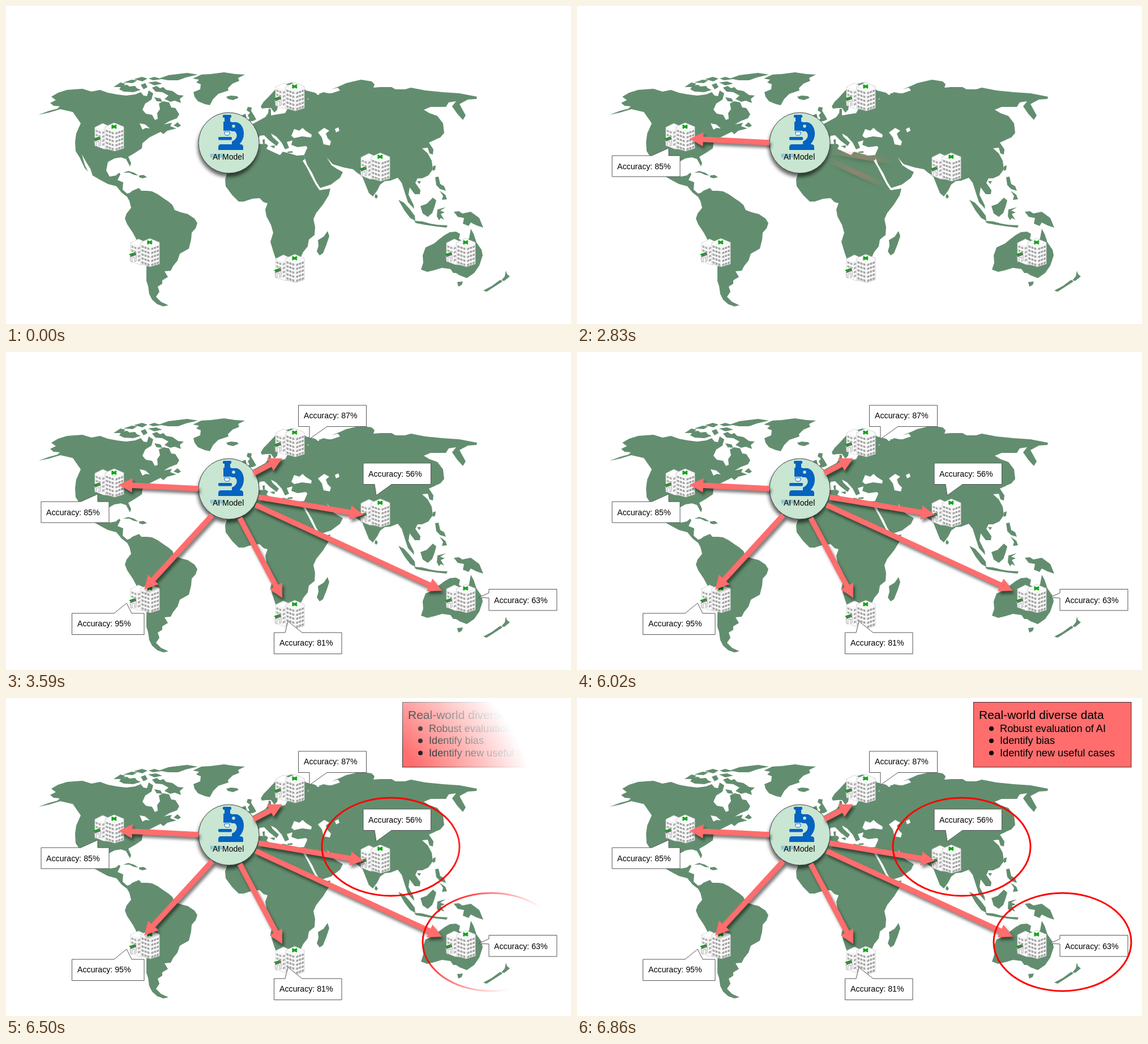
An HTML page for the animation above (9040 ms loop, 998 px wide and 561 px high).

```html
<!DOCTYPE html>
<html lang="en">
<head>
<meta charset="utf-8">
<title>AI model accuracy map</title>
<style>
html, body { margin: 0; width: 100%; height: 100%; overflow: hidden; background: #fff; }
svg { position: absolute; left: 0; top: 0; width: 998px; height: 561px; font-family: "Liberation Sans", Arial, sans-serif; }
.layer {
  --r: 0px;
  -webkit-mask-image: radial-gradient(circle at 499px 280.5px, #000 calc(var(--r) - 180px), transparent var(--r));
  mask-image: radial-gradient(circle at 499px 280.5px, #000 calc(var(--r) - 180px), transparent var(--r));
}
.land { fill: #628e6f; }
.sea { fill: #fff; }
.arrow { fill: #ff6d6d; filter: drop-shadow(3px 5px 2.5px rgba(0,0,0,.5)); }
.box { fill: #fff; stroke: #555; stroke-width: 1; }
.ring { fill: none; stroke: #f00; stroke-width: 3; }
.label { font-size: 14.2px; }
.model { filter: drop-shadow(-1px 6px 3px rgba(0,0,0,.6)); }
</style>
</head>
<body>
<svg viewBox="0 0 998 561">
  <defs>
    <g id="hospital">
      <path d="M3 8L17 1L30 7V47L18 46L3 40Z" fill="#fff" stroke="#ccc" stroke-width=".8"/>
      <path d="M3 8L15 14V44M15 14L30 7" fill="none" stroke="#e2e2e2" stroke-width=".8"/>
      <g id="wingWindows" fill="#b0b0b0"></g>
      <path d="M2 31L13 29V40L10 41V33L6 34V42L3 41Z" fill="#eee" stroke="#999" stroke-width=".7"/>
      <path d="M0 28L10 24.5L13 26.5L3 30.5Z" fill="#169c1c"/>
      <path d="M3 30.5L13 26.5V29L3 33Z" fill="#666"/>
      <path d="M21 7L37 0L54 7V45L38 50L21 45Z" fill="#fff" stroke="#c4c4c4" stroke-width=".8"/>
      <path d="M21 7L38 14L54 7M38 14V50" fill="none" stroke="#e2e2e2" stroke-width=".8"/>
      <g id="towerWindows" fill="#a6a6a6"></g>
      <path d="M32.5 4.5L41 9.5M41 4.5L32.5 9.5" stroke="#13a519" stroke-width="3.2"/>
    </g>
  </defs>

  <g class="land">
    <!-- North America, then its western side -->
    <path d="M57 192L76 185L91 181L95 177L84 176L78 171L88 166L80 160L92 153L108 148L135 146L151 151L166 148L180 153L196 156L212 158L228 156L238 152L243 158L249 159L252 149L260 154L257 165L246 172L241 183L247 190L258 192L263 201L268 199L267 189L272 182L270 172L278 168L288 170L292 179L299 180L306 191L302 198L289 203L279 209L293 206L290 212L301 216L285 220L278 226L273 222L253 232L241 242L240 251L228 259L216 266L221 277L219 283L212 270L203 267L191 269L180 275L150 230L132 207L118 187L96 182L76 188Z"/>
    <path d="M190 230L191 269L180 275L177 290L183 301L194 299L200 294L202 297L197 307L207 311L206 324L214 331L224 328L228 332L213 336L204 329L195 318L180 314L165 306L153 299L149 287L142 276L134 262L139 280L145 292L139 286L130 267L123 256L122 240L124 225L132 207L127 196Z"/>
    <!-- Arctic islands -->
    <path d="M200 147L205 140L214 139L218 142L228 141L231 145L238 148L225 152L208 151Z"/>
    <path d="M190 143L202 135L211 137L204 143Z"/>
    <path d="M207 135L222 130L232 131L224 136Z"/>
    <path d="M226 129L240 125L250 128L241 133Z"/>
    <path d="M238 139L246 136L250 143L243 147Z"/>
    <path d="M251 135L265 133L276 137L262 140Z"/>
    <path d="M252 128L262 125L275 129L260 131Z"/>
    <path d="M270 128L287 122L320 118L339 121L318 126L304 131L286 131Z"/>
    <path d="M258 144L266 141L272 145L278 143L283 148L294 150L304 157L314 158L307 164L309 171L298 167L290 169L280 164L287 158L276 152L264 151Z"/>
    <path d="M262 161L273 163L276 169L266 168Z"/>
    <path d="M296 211L303 205L309 211L304 214Z"/>
    <!-- Greenland, Iceland -->
    <path d="M330 128L345 121L362 120L385 117L405 120L422 121L410 127L412 132L400 137L392 145L393 149L375 155L366 164L360 175L351 173L339 168L333 160L331 152L343 147L344 138L336 135L341 130Z"/>
    <path d="M389 160L397 158L408 159L411 162L401 166L392 164Z"/>
    <!-- Caribbean -->
    <path d="M207 294L216 291L226 294L234 299L226 298L218 294Z"/>
    <path d="M235 299L243 298L249 302L241 304L235 302Z"/>
    <!-- South America -->
    <path d="M213 335L223 326L235 321L239 326L249 326L258 327L268 332L278 339L287 345L294 351L298 360L309 364L321 367L333 375L338 383L335 392L328 400L327 412L323 428L307 437L303 449L295 459L291 467L280 468L286 478L276 484L276 490L268 495L271 504L265 513L274 522L287 528L278 530L267 526L258 518L253 508L251 494L248 485L248 465L249 442L247 427L232 415L224 400L214 385L210 375L213 366L221 356L218 344Z"/>
    <!-- Africa -->
    <path d="M425 248L440 244L459 243L463 246L460 252L475 259L484 263L489 257L501 260L514 264L526 263L528 270L524 273L532 286L539 300L547 315L554 325L573 322L570 334L560 350L548 365L543 376L546 390L545 404L535 412L533 424L525 434L518 449L506 462L491 466L483 466L478 450L473 436L467 416L472 400L468 386L460 371L458 359L462 348L455 346L448 339L435 340L420 345L411 345L399 333L388 318L387 306L391 294L400 272L413 257Z"/>
    <path d="M568 397L571 406L566 421L560 436L554 440L549 433L552 423L551 413L561 407Z"/>
    <!-- Europe -->
    <path d="M422 242L424 222L440 223L432 210L447 202L458 196L463 189L464 181L468 182L468 193L480 191L493 189L498 180L510 181L560 152L650 170L630 250L560 265L534 252L530 247L515 249L504 245L506 237L496 240L500 250L493 253L487 241L477 230L468 225L471 231L482 241L478 247L465 237L456 228L448 229L444 240L433 246Z"/>
    <path d="M450 177L455 169L464 160L475 148L487 140L504 135L516 137L530 149L546 153L552 158L544 165L533 163L530 175L505 183L497 178L492 159L481 170L479 183L474 188L468 180L461 180L452 181Z"/>
    <!-- Britain, Ireland, small Mediterranean islands -->
    <path d="M427 178L434 179L433 185L438 193L442 200L436 203L426 204L430 198L427 193L431 188L425 184Z"/>
    <path d="M416 193L423 190L425 197L417 201Z"/>
    <path d="M466 247L475 246L474 251Z"/>
    <path d="M453 236L457 235L457 243L454 243Z"/>
    <path d="M497 257L506 256L506 259L498 259Z"/>
    <!-- Arabia -->
    <path d="M526 264L534 246L556 252L566 266L575 281L584 287L595 293L590 303L574 315L555 321L548 310L541 295L532 280Z"/>
    <!-- Northern Asia -->
    <path d="M528 168L540 160L556 159L553 154L575 154L590 149L586 144L575 147L590 141L601 136L627 130L646 133L651 138L649 144L661 143L681 143L688 147L705 147L715 144L741 149L771 152L801 154L832 160L831 164L816 165L801 173L807 184L812 193L807 201L797 190L788 177L795 168L782 170L777 178L750 178L738 183L748 189L762 194L772 207L774 224L767 232L755 237L745 240L600 250L540 240L510 190Z"/>
    <!-- Southern and eastern Asia -->
    <path d="M545 225L750 220L758 236L747 241L755 253L754 262L748 260L745 250L735 251L745 260L752 273L754 288L746 299L735 304L727 304L723 312L732 325L731 332L722 332L713 320L711 333L720 351L721 358L710 346L705 331L699 312L692 303L679 308L669 309L661 315L656 325L648 336L641 330L635 315L629 300L620 294L613 288L597 285L577 279L563 263L540 249Z"/>
    <path d="M653 331L657 336L654 340L651 337Z"/>
    <path d="M754 283L759 281L758 289L754 291Z"/>
    <path d="M726 309L733 309L730 314Z"/>
    <!-- South-east islands -->
    <path d="M758 302L764 301L767 314L774 318L777 326L767 323L760 316Z"/>
    <path d="M766 326L776 333L779 341L770 342L772 335Z"/>
    <path d="M693 342L703 347L713 358L722 370L723 379L714 374L704 361Z"/>
    <path d="M721 379L735 380L750 384L762 386L780 387L778 391L760 389L740 386L724 383Z"/>
    <path d="M732 353L743 349L754 338L760 343L757 354L753 365L745 372L736 366Z"/>
    <path d="M762 359L777 355L767 361L775 364L768 367L774 377L768 374L765 378L761 371Z"/>
    <path d="M791 363L800 362L806 366L821 363L836 374L843 391L831 387L821 382L817 388L807 384L809 374L798 372Z"/>
    <!-- Australia, New Zealand -->
    <path d="M733 465L737 453L736 440L741 426L756 419L767 410L775 404L784 399L795 398L802 402L800 411L812 417L818 410L821 393L826 402L831 417L840 430L842 440L836 458L827 471L814 480L801 475L795 471L790 471L785 464L770 462L757 466L744 469Z"/>
    <path d="M797 487L807 486L805 492L799 495Z"/>
    <path d="M883 467L885 473L890 477L880 485L875 484L881 477Z"/>
    <path d="M873 483L877 486L863 495L849 504L843 502L858 494Z"/>
  </g>
  <g class="sea">
    <path d="M504 229L509 217L518 220L524 215L529 220L540 227L539 232L523 230L509 233Z"/>
    <path d="M551 223L562 215L571 220L565 225L568 233L574 239L572 246L561 244L558 232Z"/>
    <path d="M581 217L587 214L589 220L583 223Z"/>
    <path d="M236 207L246 209L254 216L247 215L241 218Z"/>
  </g>

  <g id="hospitals"></g>

  <circle class="model" cx="393.5" cy="241.5" r="53.5" fill="#c8e6d2" stroke="#444"/>
  <g fill="#0563c1">
    <rect x="383" y="192" width="15" height="5" rx="1.5"/>
    <path d="M386 197H396V204H398V220H384V204H386Z"/>
    <path d="M386 222H395V226L393 228H388L386 226Z" fill="#fff" stroke="#0563c1"/>
    <path d="M398 205H407C421 208 425 231 413 243V246H399V239C409 235 410 226 404 221H398Z"/>
    <rect x="375" y="231" width="24" height="5.5" rx="2"/>
    <path d="M375 254V249Q375 244 380 244H414Q419 244 419 249V254Z"/>
    <circle cx="402" cy="212" r="2.8" fill="#c8e6d2"/>
  </g>
  <g font-size="3" fill="#0563c1" text-decoration="underline">
    <text x="361" y="263">Icon from a free set</text>
    <text x="361" y="266">for open lab use</text>
  </g>
  <text x="365" y="271" font-size="14">AI Model</text>
</svg>

<svg class="layer" viewBox="0 0 998 561"></svg>
<svg class="layer" viewBox="0 0 998 561"></svg>
<svg class="layer" viewBox="0 0 998 561">
  <ellipse class="ring" cx="679.5" cy="262.5" rx="121.5" ry="86.5"/>
  <ellipse class="ring" cx="857.5" cy="430.5" rx="121.5" ry="86.5"/>
  <rect x="700.5" y="7.5" width="278.5" height="114.5" fill="#ff6d6d" stroke="#333"/>
  <text x="710" y="37" font-size="21">Real-world diverse data</text>
  <g font-size="18.2">
    <circle cx="732" cy="54" r="4"/><text x="747" y="60">Robust evaluation of AI</text>
    <circle cx="732" cy="75.5" r="4"/><text x="747" y="81">Identify bias</text>
    <circle cx="732" cy="97" r="4"/><text x="747" y="103">Identify new useful cases</text>
  </g>
</svg>

<script>
const LOOP = 9040, STEP = 40;
const byId = id => document.getElementById(id);
const layers = [...document.querySelectorAll('.layer')];

// Rows of small slanted windows on one face of a building
function windows(x, y, cols, rows, dx, slope) {
  let d = '';
  for (let r = 0; r < rows; r++)
    for (let c = 0; c < cols; c++)
      d += `M${x + c * dx} ${y + r * 7 + c * dx * slope}l3.8 ${3.8 * slope}v4l-3.8 ${-3.8 * slope}z`;
  return `<path d="${d}"/>`;
}
byId('wingWindows').innerHTML = windows(4.5, 12, 2, 3, 5, .4) + windows(16, 16, 1, 4, 5, -.4);
byId('towerWindows').innerHTML = windows(22.5, 12, 3, 5, 5, .35) + windows(39.5, 17, 3, 5, 4.8, -.35);

byId('hospitals').innerHTML = [[154, 206], [473, 135], [624, 259], [217, 410], [473, 438], [775, 410]]
  .map(([x, y]) => `<use href="#hospital" x="${x}" y="${y}"/>`).join('');

function arrow(x1, y1, x2, y2) {
  const len = Math.hypot(x2 - x1, y2 - y1), neck = len - 24;
  const angle = Math.atan2(y2 - y1, x2 - x1) * 180 / Math.PI;
  return `<g class="arrow"><path transform="translate(${x1} ${y1}) rotate(${angle})"
    d="M0 -4.8H${neck}V-12.5L${len} 0L${neck} 12.5V4.8H0Z"/></g>`;
}

// The outline is given whole, so that the pointer merges with the box
function callout(outline, x, y, percent) {
  return `<path class="box" d="${outline}Z"/><text class="label" x="${x}" y="${y}">Accuracy: ${percent}%</text>`;
}

layers[0].innerHTML = arrow(340, 241, 199, 234) +
  callout('M62 264H132L162 250.5V264H182V301H62', 71, 288, 85);

layers[1].innerHTML =
  arrow(437, 214, 488, 187.5) + arrow(446, 256, 632, 287) + arrow(364, 288, 244, 419) +
  arrow(413, 293, 488, 434) + arrow(441, 270, 770, 421) +
  callout('M516.5 94H636.5V131.5H567L536 153.5V131.5H516.5', 526, 117, 87) +
  callout('M631 196H750.5V233.5H681L654 253L651 233.5H631', 640, 220, 56) +
  callout('M116.5 461H191L213 443L222 461H244V498.5H116.5', 126, 484, 95) +
  callout('M473.5 495H493L498 475L523 495H593V532.5H473.5', 483, 518, 81) +
  callout('M853 418.5H973V456H853V434L835 433L853 425', 862, 442.5, 63);

// Soft circular reveals: start, end, first radius, last radius
const reveals = [[40, 440, 190, 630], [2830, 3590, 60, 696], [6020, 6860, 65, 747]];

function radius(t, [start, end, from, to]) {
  if (t < start) return 0;
  if (t >= end) return 2000;
  const passed = Math.floor((t - start) / STEP) * STEP;
  return from + (to - from) * passed / (end - start);
}

function draw() {
  const t = performance.now() % LOOP;
  layers.forEach((layer, i) => {
    const r = radius(t, reveals[i]);
    layer.style.visibility = r ? 'visible' : 'hidden';
    layer.style.setProperty('--r', r + 'px');
  });
  requestAnimationFrame(draw);
}
draw();
</script>
</body>
</html>
```
